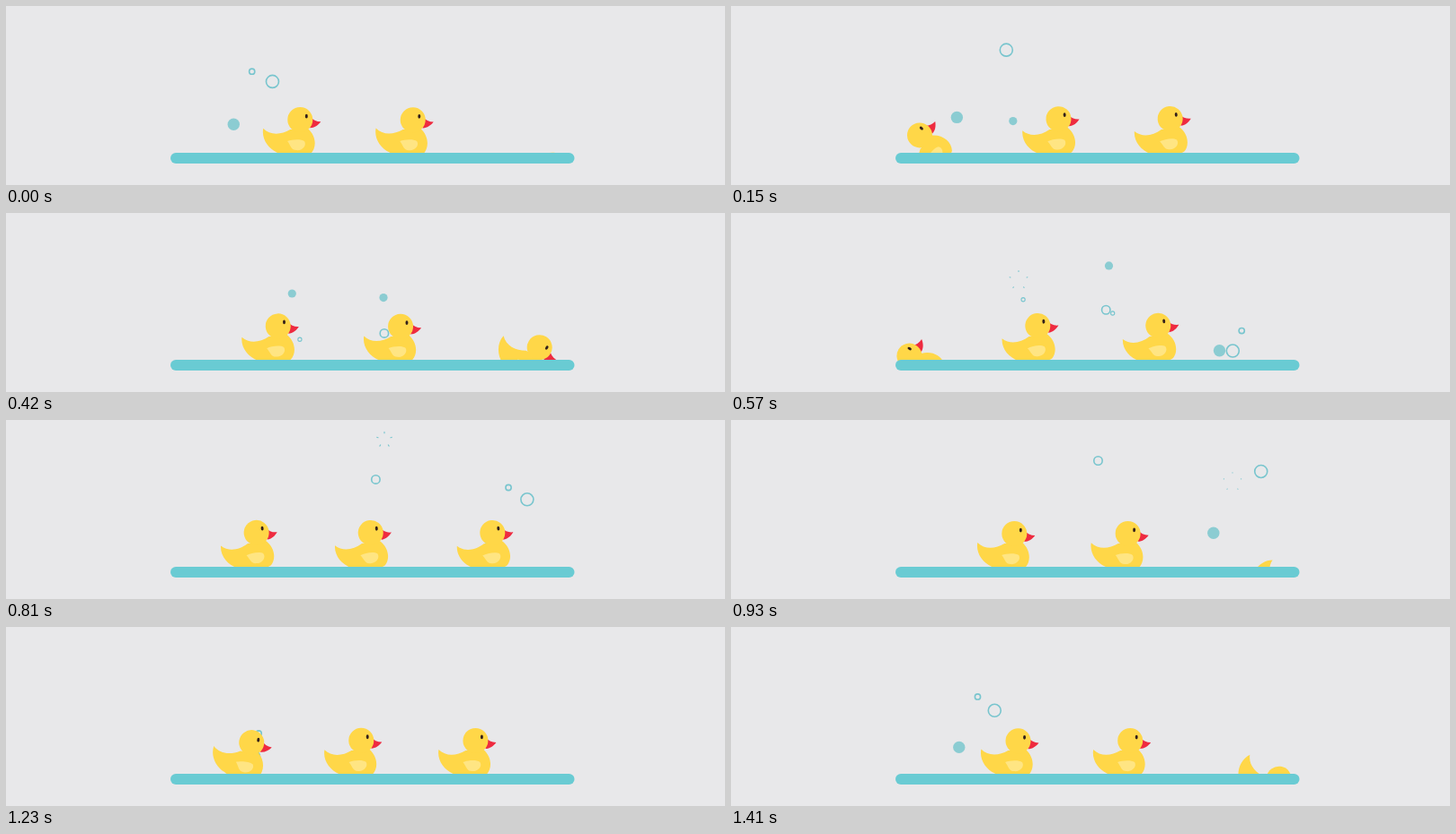
An HTML page that plays this animation: 800x200 px, repeating every 1.44 s.

```html
<!DOCTYPE html>
<html lang="en">
<head>
<meta charset="utf-8">
<title>Rubber ducks</title>
<style>
html, body { margin: 0; width: 100%; height: 100%; overflow: hidden; background: #e8e8ea; }
svg { display: block; width: 100vw; height: 100vh; }
</style>
</head>
<body>
<svg viewBox="0 0 800 200">
  <defs>
    <clipPath id="air"><rect width="800" height="168"/></clipPath>
    <g id="duck">
      <path fill="#ee2b40" d="M23 -41 C26 -37 30 -35 35 -35 C32 -31 28 -28 23 -28Z"/>
      <path fill="#ffd748" d="M-29 -27 C-21 -19 -9 -20 1 -26 L21 -27 C30 -19 31 -6 24 1 C18 5 -8 5 -13 0 C-24 -5 -31 -16 -29 -27Z"/>
      <circle cx="12" cy="-37" r="14" fill="#ffd748"/>
      <path fill="#ffe583" d="M-2 -13 C3 -15 13 -16 17 -13 C20 -8 14 -2 8 -3 C2 -3 2 -8 -2 -13Z"/>
      <ellipse cx="19" cy="-41" rx="1.5" ry="2.4" fill="#33201a"/>
    </g>
  </defs>
  <rect width="800" height="200" fill="#e8e8ea"/>
  <g clip-path="url(#air)"><g id="bubbles"></g><g id="ducks"></g></g>
  <rect x="183" y="164" width="449.500" height="12" rx="6" fill="#69cbd3"/>
</svg>
<script>
const LOOP = 1440, STEP = 30, BURST = 75, WATER = 164;
const INK = '#78c5ce', FILL = '#8bccd2';
const NS = 'http://www.w3.org/2000/svg';

function set(el, attrs) {
  for (const k in attrs) el.setAttribute(k, attrs[k]);
}
function add(parent, tag, attrs) {
  const el = document.createElementNS(NS, tag);
  set(el, attrs);
  return parent.appendChild(el);
}
const mod = (a, n) => ((a % n) + n) % n;
const mix = (a, b, f) => a + (b - a) * f;
const clamp = f => Math.min(1, Math.max(0, f));

// Ducks: swim at constant speed, tip up out of the water, rock, then dive
const LEAD = 480, SPEED = 0.2685, RISEN = -235, DIVE = 800;
const layer = document.getElementById('ducks');
const flock = [0, 502, 974].map(start => ({ start, el: add(layer, 'use', { href: '#duck' }) }));

function pose(age) {
  const x = 315 + SPEED * age;
  if (age < RISEN) {
    const u = (age + 450) / (RISEN + 450), left = 1 - u;
    return [x + 28 * left * left, WATER + 36 * left ** 1.5, mix(-62, 11, clamp(u) ** 2)];
  }
  const rock = -3.2 - 4.2 * Math.cos((age - 100) / 240 * 2 * Math.PI);
  const settle = 1 - clamp((age - RISEN) / 70) ** 2;
  const dive = Math.max(0, (age - DIVE) / 108);
  return [
    x - 3 * settle + 14 * dive,
    WATER + 18 * dive * dive,
    rock + 12 * settle + 54 * dive * dive
  ];
}

// Bubbles: rise from one point to another, then burst
const linear = u => u;
const wave = u => (1 - Math.cos(Math.PI * u)) / 2;
const slowing = power => u => 1 - (1 - u) ** power;

const pool = document.getElementById('bubbles');
const bubbles = [];
function bubble(start, life, r, solid, from, to, ease = linear, sway = 0) {
  const g = add(pool, 'g', {});
  const look = solid ? { r, fill: FILL }
    : { r: r - 0.3, fill: 'none', stroke: INK, 'stroke-width': r < 3 ? 1.1 : 1.6 };
  const dot = add(g, 'circle', look);
  const rays = add(g, 'path', {
    fill: 'none', stroke: INK, 'stroke-width': r > 6 ? 1.4 : 1.1, 'stroke-linecap': 'round'
  });
  bubbles.push({ start, life, r, from, to, ease, sway, g, dot, rays });
}

function trio(start, x) {
  bubble(start, 600, 6.7, true, [x, 168], [x - 11, 123], slowing(1.5));
  bubble(start, 653, 7.3, false, [x + 12, 167], [x + 43, 40], wave, 4);
  bubble(start, 430, 3.4, false, [x + 28, 173], [x + 11, 69], slowing(1.35));
}
trio(1050, 262);
trio(435, 547);
bubble(1300, 665, 4.6, true, [309, 170], [320, 75]);
bubble(330, 330, 2.4, false, [328, 168], [324, 70]);
bubble(150, 640, 4.6, true, [419, 170], [421, 28 - 6], slowing(1.3));
bubble(210, 740, 5, false, [426, 171], [408, 42]);
bubble(390, 270, 2.4, false, [426, 168], [424, 84]);

function rayPath(r, age) {
  const a = r * 1.2 + age * 0.09, b = a + 0.1 + r * 0.4 * (1 - age / BURST);
  let d = '';
  for (let i = 0; i < 5; i++) {
    const t = (i * 72 - 90) * Math.PI / 180, c = Math.cos(t), s = Math.sin(t);
    d += `M${c * a} ${s * a}L${c * b} ${s * b}`;
  }
  return d;
}

const show = on => (on ? 'inline' : 'none');

function draw(t) {
  for (const { start, el } of flock) {
    const [x, y, tilt] = pose(mod(t - start + LEAD, LOOP) - LEAD);
    set(el, { transform: `translate(${x} ${y}) rotate(${tilt})` });
  }
  for (const b of bubbles) {
    const age = mod(t - b.start, LOOP), past = age - b.life;
    const u = clamp(age / b.life), e = b.ease(u);
    const x = mix(b.from[0], b.to[0], e) - b.sway * Math.sin(2 * Math.PI * u);
    const y = mix(b.from[1], b.to[1], e);
    const linger = b.r > 7 ? 15 : 0;
    set(b.g, { transform: `translate(${x} ${y})`, display: show(past < BURST) });
    set(b.dot, { display: show(past < linger) });
    set(b.rays, { d: past >= 0 && past < BURST ? rayPath(b.r, past) : '' });
  }
}

function frame() {
  draw(Math.floor(performance.now() % LOOP / STEP) * STEP);
  requestAnimationFrame(frame);
}
frame();
</script>
</body>
</html>
```
